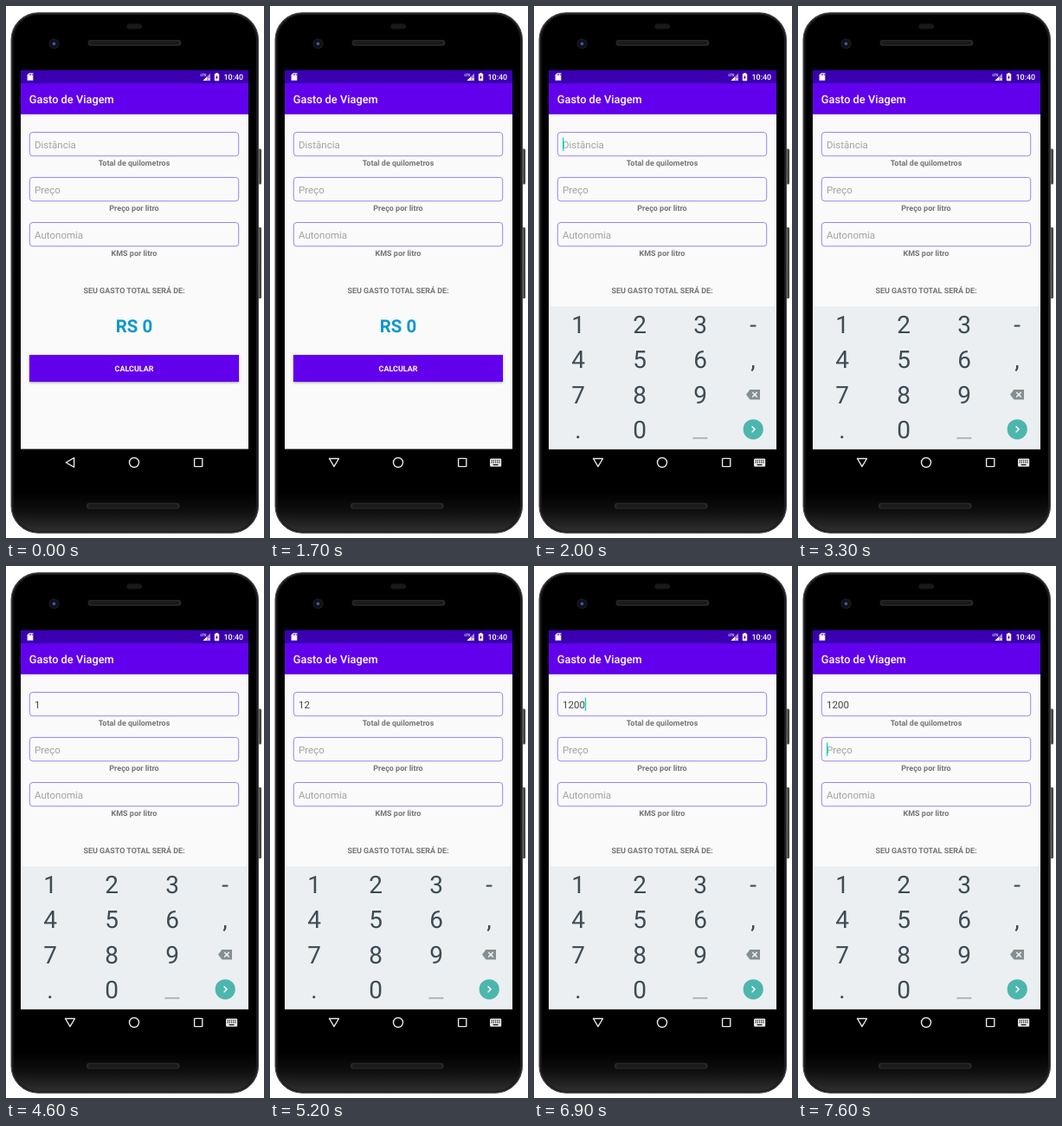
An HTML page with a canvas for the animation above (8 s loop, 298x613 px).

```html
<!DOCTYPE html>
<html lang="pt">
<head>
<meta charset="utf-8">
<title>Gasto de Viagem</title>
<style>
html, body { margin: 0; width: 100%; height: 100%; overflow: hidden; background: #fff; }
canvas { display: block; width: 298px; height: 613px; }
</style>
</head>
<body>
<canvas id="stage"></canvas>
<script>
const W = 298, H = 613, LOOP = 8000;
const canvas = document.getElementById('stage');
const ctx = canvas.getContext('2d');
const dpr = window.devicePixelRatio || 1;
canvas.width = W * dpr;
canvas.height = H * dpr;
// Unhinted advances keep small text at its true width.
ctx.textRendering = 'geometricPrecision';

// Start times of each state; the last one reached applies.
const CARET = [[0, 0], [100, 1], [600, 0], [1100, 1], [1700, 0], [2000, 1], [2500, 0],
  [2900, 1], [3300, 0], [3800, 1], [4600, 0], [4800, 1], [5200, 0], [5700, 1],
  [6500, 0], [6900, 1], [7400, 0], [7600, 1]];
const TYPED = [[0, ''], [4100, '1'], [4800, '12'], [5700, '120'], [6000, '1200']];
const PRESSED = [[0, ''], [4700, '2'], [4800, ''], [5600, '0'], [5700, ''],
  [5900, '0'], [6000, ''], [7500, 'next'], [7600, '']];

const FIELDS = [
  ['Distância', 'Total de quilometros'],
  ['Preço', 'Preço por litro'],
  ['Autonomia', 'KMS por litro']
];
const ROWS = ['123-', '456,', '789', '.0'];
const COLS = [51, 122, 192, 253];

const at = (track, t) => track.reduce((v, [start, next]) => t >= start ? next : v, track[0][1]);

function rect(x, y, w, h, fill) {
  ctx.fillStyle = fill;
  ctx.fillRect(x, y, w, h);
}

function round(x, y, w, h, r, fill, stroke, line = 1) {
  ctx.beginPath();
  ctx.roundRect(x, y, w, h, r);
  if (fill) { ctx.fillStyle = fill; ctx.fill(); }
  if (stroke) { ctx.strokeStyle = stroke; ctx.lineWidth = line; ctx.stroke(); }
}

function gradient(x0, y0, x1, y1, ...colors) {
  const g = ctx.createLinearGradient(x0, y0, x1, y1);
  colors.forEach((c, i) => g.addColorStop(i / (colors.length - 1), c));
  return g;
}

function disc(x, y, r, fill) {
  ctx.beginPath();
  ctx.arc(x, y, r, 0, Math.PI * 2);
  ctx.fillStyle = fill;
  ctx.fill();
}

function path(points, close) {
  ctx.beginPath();
  points.forEach(([x, y]) => ctx.lineTo(x, y));
  if (close) ctx.closePath();
}

function strokePath(points, color, line, close) {
  path(points, close);
  ctx.strokeStyle = color;
  ctx.lineWidth = line;
  ctx.stroke();
}

function fillPath(points, color) {
  path(points, true);
  ctx.fillStyle = color;
  ctx.fill();
}

function text(str, x, y, size, weight, color, align = 'left') {
  ctx.font = `${weight} ${size}px Roboto, sans-serif`;
  ctx.textAlign = align;
  ctx.fillStyle = color;
  ctx.fillText(str, x, y);
}

function speaker(x, y) {
  round(x, y, 108, 7, 3.5, '#262626');
  round(x + 2.5, y + 1.5, 103, 4, 2, '#1a1a1a');
}

function drawPhone() {
  rect(0, 0, W, H, '#fff');
  const metal = gradient(290, 0, 295, 0, '#2a2827', '#5d5957', '#3a3736');
  round(290, 164.5, 5, 41, 1.5, metal);
  round(290, 255, 5, 82, 1.5, metal);
  round(6, 7.8, 285.5, 599.4, 31, '#1e1e1e', '#4a4a4a');
  round(8.5, 10, 280.5, 595, 29, gradient(0, 560, 0, 606, '#000', '#101010', '#303030'));
  round(139.5, 20.5, 17.5, 6, 3, '#191919');
  speaker(94.5, 39);
  speaker(92.8, 572.5);
  disc(55.5, 43.5, 6, '#17191d');
  disc(55.5, 43.5, 4.2, '#0a0d18');
  disc(55.5, 43.5, 2.3, '#232f5c');
  disc(55.4, 43.5, 1, '#8791c4');
}

function drawBars() {
  rect(17, 74, 263, 436.7, '#fafafa');
  rect(17, 74, 263, 15, '#3a00b0');
  rect(17, 89, 263, 35.8, '#6200ee');
  text('Gasto de Viagem', 26.8, 111.6, 12.8, 500, '#fff');

  // Memory card, signal, battery, clock
  fillPath([[26.8, 77.2], [31.3, 77.2], [31.3, 85.8], [24.6, 85.8], [24.6, 79.4]], '#fff');
  [26.9, 28.4, 29.9].forEach(x => rect(x, 78.2, 0.7, 1.8, '#3a00b0'));
  text('LTE', 224.4, 80.8, 4.4, 700, '#e4d9f7');
  fillPath([[236, 77.5], [236, 86], [227.5, 86]], '#a88ddc');
  fillPath([[232, 81.5], [232, 86], [227.5, 86]], '#fff');
  strokePath([[233, 83], [236, 86]], '#fff', 0.8);
  strokePath([[236, 83], [233, 86]], '#fff', 0.8);
  round(240.8, 78, 5.4, 8.2, 0.7, '#fff');
  rect(242.3, 77, 2.3, 1.2, '#fff');
  fillPath([[244.1, 79.6], [241.9, 82.7], [243.1, 82.7], [242.8, 85], [245, 81.8], [243.8, 81.8]], '#3a00b0');
  text('10:40', 274.2, 85, 8.96, 500, '#fff', 'right');
}

function drawForm(typed, caret, focus) {
  FIELDS.forEach(([hint, label], i) => {
    const y = 145.5 + i * 52;
    const value = i ? '' : typed;
    round(27.3, y, 241.4, 27.3, 3.5, '#fafafa', '#9a84ee');
    text(value || hint, 33, y + 18.2, 11.52, 400, value ? '#444' : '#a3a3a3');
    text(label, 148, y + 38.8, 8.96, 700, '#757575', 'center');
    if (caret && focus === i) {
      ctx.font = '400 11.52px Roboto, sans-serif';
      const x = 33 + ctx.measureText(value).width;
      rect(x, y + 6, 1.3, 15.5, '#03dac5');
    }
  });
  text('SEU GASTO TOTAL SERÁ DE:', 148, 331, 8.96, 700, '#757575', 'center');
  text('RS 0', 148, 376, 20.48, 700, '#0a97d0', 'center');
  ctx.save();
  ctx.shadowColor = 'rgba(0,0,0,.35)';
  ctx.shadowBlur = 2.5 * dpr;
  ctx.shadowOffsetY = dpr;
  rect(27, 402, 242, 31, '#6200ee');
  ctx.restore();
  text('CALCULAR', 148, 420.8, 8.96, 700, '#fff', 'center');
}

function drawKeys(pressed, shift) {
  ctx.save();
  ctx.beginPath();
  ctx.rect(17, 346, 263, 168);
  ctx.clip();
  ctx.translate(0, shift);
  rect(17, 346, 263, 164.7, '#eceff1');
  ROWS.forEach((row, r) => [...row].forEach((key, c) => {
    const y = 367.3 + r * 40.25;
    if (key === pressed) rect(89, y - 15.5, 66, 30.5, '#cfd3d5');
    text(key, COLS[c], y + 9.8, 28, 400, '#3d4c54', 'center');
  }));
  rect(183.5, 497.3, 17, 1.2, '#89949a');

  fillPath([[245, 447.8], [249.4, 442], [261, 442], [261, 453.5], [249.4, 453.5]], '#848e93');
  strokePath([[252.2, 445], [257.8, 450.6]], '#eceff1', 1.5);
  strokePath([[257.8, 445], [252.2, 450.6]], '#eceff1', 1.5);

  disc(253.2, 487.8, 11.6, pressed === 'next' ? '#3c958c' : '#4db6ac');
  strokePath([[251.6, 484.4], [255, 487.8], [251.6, 491.2]], '#fff', 1.5);
  ctx.restore();
}

function drawNav(open) {
  const color = '#e6e6e6';
  rect(17, 510.7, 263, 31, '#000');
  ctx.lineJoin = 'round';
  const back = open
    ? [[68.5, 521.5], [79.5, 521.5], [74, 530.7]]
    : [[78.6, 520.7], [78.6, 531.3], [69.2, 526]];
  strokePath(back, color, 1.4, true);
  ctx.beginPath();
  ctx.arc(148, 526, 5.5, 0, Math.PI * 2);
  ctx.stroke();
  ctx.lineJoin = 'miter';
  round(217.6, 521.4, 9.2, 9.2, 0.5, null, color, 1.4);
  if (!open) return;
  round(254, 521.6, 13.2, 9.2, 1.2, color);
  for (let c = 0; c < 5; c++) {
    for (let r = 0; r < 2; r++) rect(255.5 + c * 2.2, 523.2 + r * 2.2, 1.2, 1.2, '#111');
  }
  rect(257.7, 528, 5.8, 1.2, '#111');
}

function draw(t) {
  ctx.setTransform(dpr, 0, 0, dpr, 0, 0);
  drawPhone();
  drawBars();
  drawForm(at(TYPED, t), at(CARET, t), t >= 7600 ? 1 : 0);
  drawNav(t >= 1700);
  if (t >= 1900) {
    const rising = t < 2000;
    ctx.globalAlpha = rising ? 0.8 : 1;
    drawKeys(at(PRESSED, t), rising ? 24 : 0);
    ctx.globalAlpha = 1;
  }
}

const begin = performance.now();
function tick() {
  draw((performance.now() - begin) % LOOP);
  requestAnimationFrame(tick);
}
tick();
</script>
</body>
</html>
```
